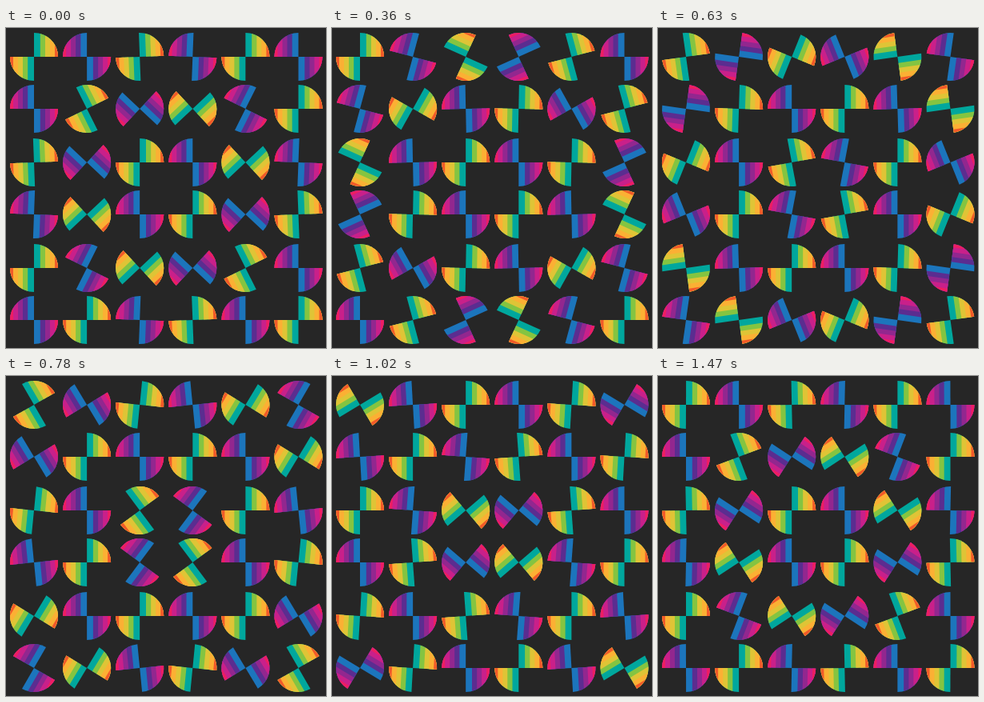
An HTML page with a canvas for the animation above (1.5 s loop, 400 px wide and 400 px high).

```html
<!DOCTYPE html>
<html>
<head>
<meta charset="utf-8">
<style>
  html, body { margin: 0; width: 100%; height: 100%; overflow: hidden; background: #262626; }
  canvas { display: block; }
</style>
</head>
<body>
<canvas id="stage" width="400" height="400"></canvas>
<script>
const ctx = document.getElementById('stage').getContext('2d');
const LOOP = 1500, STEP = 30, TURN = 1100, DELAY = 540;
const GRID = 6, RADIUS = 30;
const BANDS = [0, 7.8, 14, 20, 26];
const WARM = ['#00a79d', '#84c441', '#dfc436', '#fbb034', '#f15a29'];
const COOL = ['#1c75bc', '#5b2d90', '#92278f', '#c9208a', '#ed1e62'];

// Cubic Bezier easing (.63, 0, .34, 1), solved by bisection
function ease(u) {
  let lo = 0, hi = 1;
  for (let i = 0; i < 24; i++) {
    const s = (lo + hi) / 2, r = 1 - s;
    const x = 3 * r * r * s * 0.63 + 3 * r * s * s * 0.34 + s * s * s;
    if (x < u) lo = s; else hi = s;
  }
  return lo * lo * (3 - 2 * lo);
}

// Striped quarter disc, upper right of the origin
function quarter(colors) {
  BANDS.forEach((x, i) => {
    ctx.fillStyle = colors[i];
    ctx.beginPath();
    ctx.moveTo(x, 0);
    ctx.arc(0, 0, RADIUS, -Math.acos(x / RADIUS), 0);
    ctx.fill();
  });
}

function tile(row, col, time) {
  const odd = (row + col) % 2;
  const mid = (GRID - 1) / 2;
  const start = DELAY * Math.hypot(row - mid, col - mid);
  const local = ((time - start) % LOOP + LOOP) % LOOP;
  const turn = local < TURN ? ease(local / TURN) : 1;
  ctx.save();
  ctx.translate(35 + 66.1 * col, 36 + 66 * row - row % 2);
  ctx.scale(odd ? -1 : 1, 1);
  ctx.rotate(-Math.PI * turn);
  for (let half = 0; half < 2; half++) {
    quarter(odd ? COOL : WARM);
    ctx.rotate(Math.PI);
  }
  ctx.restore();
}

function draw() {
  const time = Math.floor(performance.now() % LOOP / STEP) * STEP;
  ctx.fillStyle = '#262626';
  ctx.fillRect(0, 0, 400, 400);
  for (let row = 0; row < GRID; row++)
    for (let col = 0; col < GRID; col++) tile(row, col, time);
  requestAnimationFrame(draw);
}
draw();
</script>
</body>
</html>
```
